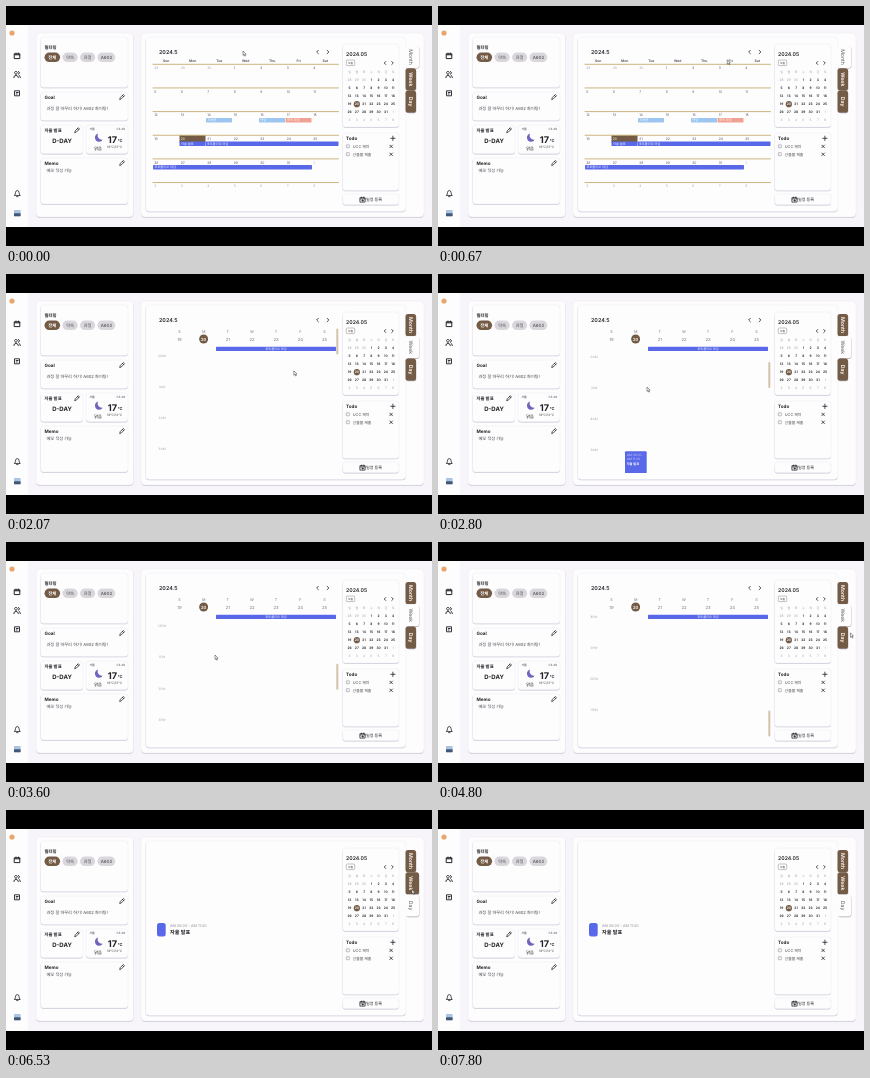
These frames come from a looping animation (426 px wide and 240 px high, 7.87 s). An HTML page:

```html
<!DOCTYPE html>
<html lang="ko">
<head>
<meta charset="utf-8">
<title>Planner</title>
<style>
  html, body { margin: 0; width: 100%; height: 100%; overflow: hidden; background: #000; }
  svg { display: block; width: 100%; height: 100%; }
  text { font-family: Inter, "Noto Sans CJK KR", "Noto Sans CJK", sans-serif; text-rendering: geometricPrecision; }
</style>
</head>
<body>
<svg id="stage" viewBox="0 0 426 240"></svg>
<script>
const LOOP = 7870, STEP = 200 / 3;
const WEEK_AT = 1670, DAY_AT = 5070;
const INK = '#222126', BROWN = '#735b45', GOLD = '#c7ad72', BLUE = '#5868e8', GREY = '#a3a0a8';
const PAPER = '#fefdfe';
const stage = document.getElementById('stage');

const rect = (x, y, w, h, fill, r = 0, extra = '') =>
  `<rect x="${x}" y="${y}" width="${w}" height="${h}" rx="${r}" fill="${fill}" ${extra}/>`;
const circle = (x, y, r, fill) => `<circle cx="${x}" cy="${y}" r="${r}" fill="${fill}"/>`;
const line = (d, color = INK, w = 0.8) =>
  `<path d="${d}" fill="none" stroke="${color}" stroke-width="${w}" stroke-linecap="round" stroke-linejoin="round"/>`;
// y is the vertical middle of the text
const label = (s, x, y, size, { fill = INK, weight = 400, anchor = 'start' } = {}) =>
  `<text x="${x}" y="${y + size * 0.36}" font-size="${size}" fill="${fill}" font-weight="${weight}" text-anchor="${anchor}">${s}</text>`;
const mid = (s, x, y, size, fill = INK, weight = 400) => label(s, x, y, size, { fill, weight, anchor: 'middle' });
const bold = (s, x, y, size) => label(s, x, y, size, { weight: 700 });
const card = (x, y, w, h, r = 3) =>
  rect(x, y + 0.8, w, h, '#c3bfd0', r) + rect(x, y, w, h, PAPER, r, 'stroke="#ebe8f2" stroke-width=".5"');
const pencil = (x, y) => line(`M${x - 2.2} ${y + 2.2}l.5-1.7 3-3 1.2 1.2-3 3zM${x + .4} ${y - 1.6}l1.2 1.2`, INK, 0.75);
const chevron = (x, y, dir, s = 1.7) =>
  line(`M${x - dir * s / 2} ${y - s}L${x + dir * s / 2} ${y}L${x - dir * s / 2} ${y + s}`, INK, 0.8);
const range = n => [...Array(n).keys()];

// May 2024 grid, starting on Sunday 28 April
const dayOf = i => i < 3 ? 28 + i : i < 34 ? i - 2 : i - 33;
const inMonth = i => i >= 3 && i < 34;

function sidebar() {
  return rect(0, 19, 22, 202, PAPER) +
    circle(6, 27, 2.6, '#e7a66b') +
    line('M8.6 47.8h5.2v4.8h-5.2zM8.6 48.8h5.2M10 47v1M12.4 47v1', INK, 1) +
    line('M10 68.2a1.4 1.4 0 1 0-.1 0M7.8 71.6q0-2.2 2.2-2.2t2.4 2.2M12.4 65.5a1.4 1.4 0 0 1 0 2.7M13.2 69.5q1.2.5 1.2 2.1', INK, 0.9) +
    line('M8.9 84.8h4.6v5h-4.6zM10.2 86.5h2M10.2 88h1', INK, 0.9) +
    line('M8.6 189.2q1-1 1-2.9a1.7 1.7 0 0 1 3.4 0q0 1.9 1 2.9zM10.6 190.6h1.4', INK, 0.8) +
    rect(8, 204, 6.6, 6.2, '#a9c4df', 0.6) + rect(8, 207.2, 6.6, 3, '#3f587a', 0.4);
}

function leftPanel() {
  const pill = (s, x, w, on) => rect(x, 46.5, w, 9.6, on ? BROWN : '#d9d7dc', 4.8) +
    mid(s, x + w / 2, 51.3, 4.4, on ? '#fff' : '#4e4b52', on ? 600 : 500);
  return card(30, 27, 97.5, 184, 4) +
    card(34.5, 31, 87.5, 50.5) + bold('필터링', 38.5, 41, 4.4) +
    pill('전체', 38.5, 15.6, true) + pill('약속', 56.5, 15.2) + pill('과정', 74, 15.2) + pill('A602', 91.5, 17.8) +
    card(34.5, 86, 87.5, 28.5) + bold('Goal', 38.5, 91, 4.6) + pencil(116, 91) +
    label('과정 잘 마무리 하기! A602 화이팅!', 40.5, 102, 4.2, { fill: '#444149' }) +
    card(34.5, 119, 42.5, 28.7) + bold('자율 발표', 38.5, 124.2, 4.4) + pencil(71, 124.2) +
    mid('D-DAY', 56, 135, 6, INK, 700) +
    card(80, 119, 42, 28.7) + label('서울', 83.3, 123.2, 3) +
    label('03:48', 119, 123.2, 3, { anchor: 'end', fill: '#55525a' }) +
    `<path d="M92 127.6a4.2 4.2 0 1 0 4.7 6.2a4.4 4.4 0 0 1-4.7-6.2z" fill="#6c64bd"/>` +
    mid('맑음', 92, 142.2, 4.2) + bold('17', 101.7, 134, 9.2) + bold('°C', 111.8, 135, 4) +
    mid('18°C/12°C', 108.5, 141, 3.2, '#55525a') +
    card(34.5, 152, 87.5, 46) + bold('Memo', 38.5, 157, 4.6) + pencil(116, 157) +
    label('메모 작성 가능', 40.5, 164, 4.2, { fill: '#444149' });
}

function miniCalendar() {
  const days = [...'일월화수목금토'].map((s, i) => mid(s, 343.6 + i * 7.25, 66.3, 3, GREY)).join('');
  const dates = range(42).map(i => {
    const x = 343.6 + i % 7 * 7.25, y = 74.2 + Math.floor(i / 7) * 8, today = i === 22;
    return (today ? circle(x, y, 3.1, BROWN) : '') +
      mid(dayOf(i), x, y, 3.3, today ? '#fff' : inMonth(i) ? INK : GREY, inMonth(i) ? 600 : 400);
  }).join('');
  return card(336.5, 38, 56.5, 83) + label('2024.05', 340, 48, 5.2, { weight: 600 }) +
    rect(340.3, 54, 8.4, 5.6, '#fff', 1, 'stroke="#8c8177" stroke-width=".5"') + mid('오늘', 344.5, 56.8, 2.8) +
    chevron(379, 57, -1, 1.5) + chevron(386.5, 57, 1, 1.5) + days + dates;
}

function todo() {
  const item = (s, y) => rect(340.3, y - 1.5, 3, 3, '#fff', 0.4, 'stroke="#77737d" stroke-width=".5"') +
    label(s, 346.8, y, 3.8, { fill: '#444149' }) +
    line(`M383.8 ${y - 1.2}l2.6 2.6M386.4 ${y - 1.2}l-2.6 2.6`, INK, 0.8);
  return card(336.5, 127, 56.5, 57.5) + bold('Todo', 340, 132.3, 4.6) +
    line('M384.7 132.3h4.4M386.9 130.1v4.4', INK, 0.8) +
    item('UCC 제작', 140.3) + item('산출물 제출', 148.2) +
    card(336.5, 188, 56.5, 10.7) +
    line('M354.3 191.7h4.8v4.4h-4.8zM354.3 192.9h4.8M355.6 191v.8M357.8 191v.8M356.7 193.7v1.6M355.9 194.5h1.6', INK, 0.75) +
    label('일정 등록', 359.9, 193.8, 4.1, { weight: 500 });
}

const calendarHeader = () => label('2024.5', 153, 46, 5.4, { weight: 600 }) + chevron(311.5, 46, -1) + chevron(322, 46, 1);

function eventBar(x, y, w, s, fill = BLUE) {
  return rect(x, y, w, 4.4, fill, 0.7) + label(s, x + 1.5, y + 2.2, 3.2, { fill: '#fff', weight: 500 });
}

function monthView() {
  const colX = i => 147 + i * 26.5, rowY = i => 58.3 + i * 23.65;
  const names = ['Sun', 'Mon', 'Tue', 'Wed', 'Thu', 'Fri', 'Sat']
    .map((s, i) => mid(s, colX(i) + 13.2, 54.8, 3.4, '#4d4751', 600)).join('');
  const rows = range(6).map(i => line(`M${colX(0)} ${rowY(i)}H${colX(7)}`, GOLD, 0.9)).join('');
  const dates = range(42).map(i =>
    label(dayOf(i), colX(i % 7) + 1.2, rowY(Math.floor(i / 7)) + 3.6, 3.4,
      { fill: i === 22 ? '#fff' : inMonth(i) ? '#5d5864' : '#aaa6b1' })).join('');
  return calendarHeader() + names + rect(colX(1), rowY(3), 26, 7.2, BROWN) + rows + dates +
    eventBar(colX(2), 112, 26, '프레젠', '#9cc6ef') + eventBar(colX(4), 112, 26, '면담', '#9cc6ef') +
    eventBar(colX(5), 112, 26, '회의 모임', '#efa291') +
    eventBar(colX(1), 135.5, 25.8, '자율 발표') + eventBar(colX(2) - 0.5, 135.5, 133, '포트폴리오 마감') +
    eventBar(colX(0), 159, 159, '포트폴리오 마감');
}

function weekView(scroll) {
  const top = 82, hour = 31.1, colX = i => 173.5 + i * 24.15;
  const hours = range(24).map(h => {
    const y = top + h * hour - scroll;
    return y < 72 || y > 201 ? '' : mid(`${h % 12 || 12}${h < 12 ? 'AM' : 'PM'}`, 156, y, 3.2, '#aaa7b0');
  }).join('');
  const y = top + 9 * hour - scroll + 0.9;
  const event = rect(187, y, 21.7, 2 * hour, BLUE, 1) +
    ['AM 09:00 -', 'AM 11:00', '자율 발표'].map((s, i) =>
      label(s, 188.7, y + 3.4 + i * 4.5, 3.2, { fill: i < 2 ? '#c5cbff' : '#fff', weight: i < 2 ? 400 : 700 })).join('');
  const head = [...'SMTWTFS'].map((s, i) => {
    const x = colX(i), today = i === 1;
    return mid(s, x, 57.3, 3.8, '#8e8a94', 500) + (today ? circle(x, 65, 4.5, BROWN) : '') +
      mid(19 + i, x, 65, 4.2, today ? '#fff' : '#77727d', today ? 600 : 400);
  }).join('');
  return `<g clip-path="url(#body)">${hours}${event}</g>` + calendarHeader() + head +
    rect(210, 72.7, 120, 4.4, BLUE, 0.7) + mid('포트폴리오 마감', 270, 74.9, 3.2, '#fff', 500) +
    rect(330.3, 54.5 + scroll / 5.52, 2, 26, '#d3c2ad', 1);
}

const dayView = () => rect(151, 113, 8.7, 13.5, BLUE, 2.5) +
  label('AM 09:00 - AM 11:00', 164, 116, 3.7, { fill: '#8c8991' }) + label('자율 발표', 164, 122.3, 5.2, { weight: 600 });

// Smooth interpolation through [time, ...values] keys
function track(keys, t) {
  const i = keys.findIndex(k => k[0] > t);
  if (i < 0) return keys[keys.length - 1].slice(1);
  if (i === 0) return keys[0].slice(1);
  const a = keys[i - 1], b = keys[i], p = (t - a[0]) / (b[0] - a[0]), e = p * p * (3 - 2 * p);
  return a.slice(1).map((v, j) => v + (b[j + 1] - v) * e);
}
const cursorKeys = [[0, 237, 45], [350, 237, 45], [1200, 404, 73], [1700, 404, 73], [2350, 209, 113], [4000, 209, 113],
  [4700, 413, 90.5], [5250, 406, 94], [6000, 406, 94], [6450, 406, 79.5], [6750, 406, 79.5], [7300, 430, 82]];
const scrollKeys = [[2450, 0], [2800, 185.6], [3200, 371], [3600, 371], [4150, 629]];

function tabs(active, cx, cy) {
  return ['Month', 'Week', 'Day'].map((s, i) => {
    const y = 40 + i * 22.3, on = i === active;
    const hover = cx > 400 && cx < 411 && cy > y && cy < y + 22;
    const w = on || hover ? 13 : 10;
    return rect(400, y + 0.6, w + 0.3, 22, '#aaa3ad', 2.6) + rect(399.5, y, w + 0.5, 22, on ? PAPER : BROWN, 2.6) +
      `<g transform="translate(404.4 ${y + 11}) rotate(90)">` +
      mid(s, 0, -0.2, 5.2, on ? '#5f5a61' : '#fff', on ? 400 : 600) + '</g>';
  }).join('');
}

stage.innerHTML = `<defs>
    <clipPath id="screen"><rect y="19" width="426" height="202"/></clipPath>
    <clipPath id="body"><rect x="146" y="71" width="186" height="128"/></clipPath>
  </defs>
  <rect width="426" height="240"/>
  <g clip-path="url(#screen)">
    ${rect(0, 19, 426, 202, '#f8f5fa')}${sidebar()}${leftPanel()}
    ${card(135, 27, 283, 184, 4)}${card(139.5, 31, 260.5, 174.5, 4)}
    <g id="view"></g>${miniCalendar()}${todo()}<g id="tabs"></g>
    <path id="cursor" d="M0 0v4.4l1-.9.8 1.7.7-.3-.8-1.7h1.4z" fill="#fff" stroke="#333" stroke-width=".5"/>
  </g>`;
const [viewEl, tabsEl, cursorEl] = ['view', 'tabs', 'cursor'].map(id => document.getElementById(id));

function render(time) {
  const t = Math.floor((time % LOOP) / STEP + 0.01) * STEP;
  const active = t < WEEK_AT ? 0 : t < DAY_AT ? 1 : 2;
  const [cx, cy] = track(cursorKeys, t);
  viewEl.innerHTML = active === 0 ? monthView() : active === 1 ? weekView(track(scrollKeys, t)[0]) : dayView();
  tabsEl.innerHTML = tabs(active, cx, cy);
  cursorEl.setAttribute('transform', `translate(${cx} ${cy})`);
}

const start = performance.now();
function tick() {
  render(performance.now() - start);
  requestAnimationFrame(tick);
}
tick();
</script>
</body>
</html>
```
